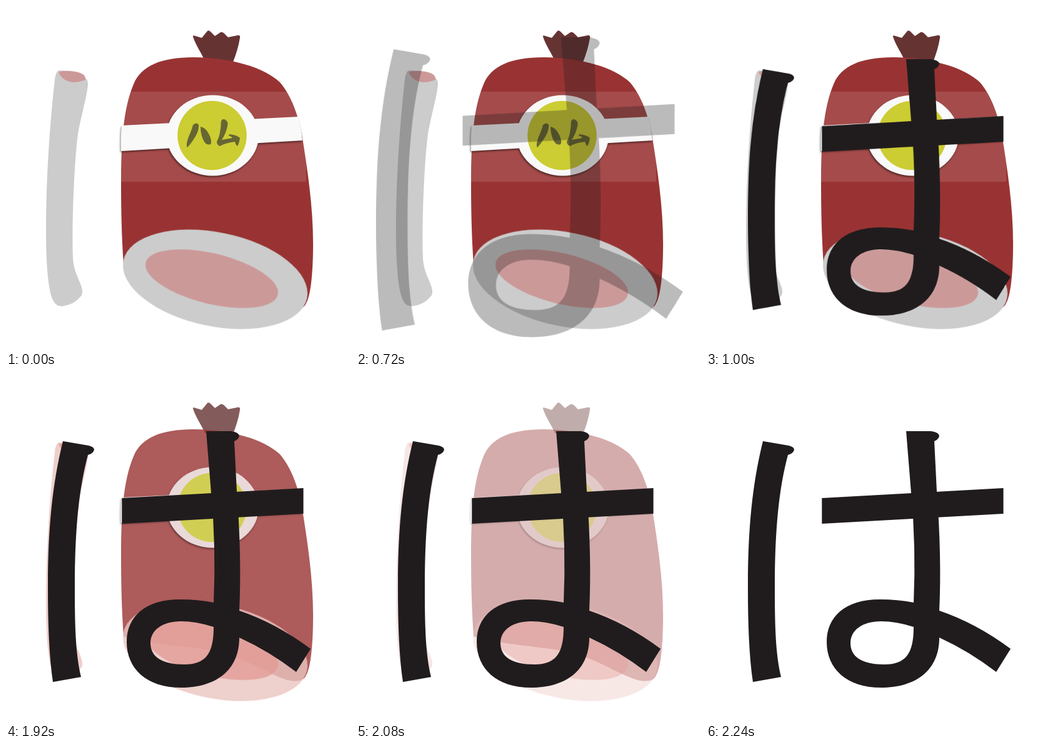
An HTML page without scripts for the animation above (2960 ms loop, 550x550 px).

```html
<!DOCTYPE html>
<html lang="ja">
<head>
<meta charset="utf-8">
<title>は</title>
<style>
  html, body { margin: 0; height: 100%; overflow: hidden; background: #fff; }
  svg { display: block; width: 100vw; height: 100vh; }

  .fade { animation: fade 2960ms infinite; }
  .rind { fill: #ccc; --warm: #eac4bf; }
  .meat { fill: #c99; --warm: #e39a95; }
  .rind, .meat { animation: fade 2960ms infinite, blush 2960ms step-end infinite; }
  .shine { animation: vanish 2960ms step-end infinite; }
  .wrapper { fill: #f9f9f9; filter: drop-shadow(-1px 2px 1.5px rgb(0 0 0 / .5)); }
  .kana {
    fill: #201c1d;
    transform-origin: 274px 290.5px;
    animation: land 2960ms infinite;
  }

  /* the letter shrinks into place, ten steps of 40 ms */
  @keyframes land {
    0% { opacity: 0; transform: scale(1.24); animation-timing-function: step-end; }
    20.27% { opacity: 0; transform: scale(1.24); animation-timing-function: steps(10); }
    33.78%, 100% { opacity: 1; transform: none; }
  }
  /* the ham drops to 80 %, then fades evenly */
  @keyframes fade {
    0% { opacity: 1; animation-timing-function: step-end; }
    64.864% { opacity: .8; animation-timing-function: steps(8); }
    75.675%, 100% { opacity: 0; }
  }
  @keyframes blush { 64.864%, 100% { fill: var(--warm); } }
  @keyframes vanish { 64.864%, 100% { visibility: hidden; } }
</style>
</head>
<body>
<svg viewBox="0 0 550 550" role="img" aria-label="ハム, は">
  <defs>
    <path id="body" d="M188 413C185 370 184 330 184 285C184 220 187 165 204 125C216 96 247 82 300 82
      C362 83 412 98 438 122C458 146 467 176 473 205C482 262 491 320 491 380C491 420 488 462 480 475
      Q476 487 455 484C425 478 390 450 340 438C290 428 225 426 188 413Z"/>
    <clipPath id="inBody"><use href="#body"/></clipPath>
  </defs>

  <path class="rind" d="M84 103Q79 106 78 118C70 190 64 275 64 360C64 410 67 450 74 468Q79 481 90 480
    Q108 478 119 465Q124 460 121 450C117 436 108 425 107 402C105 350 109 250 115 205
    C120 176 130 142 131 125Q131 117 126 115Q112 103 84 103Z"/>
  <path class="meat" d="M84 106C90 102 118 103 125 111Q128 115 127 118Q117 122 107 122Q90 120 84 106Z"/>

  <path class="fade" fill="#633" d="M299 49Q298 46 303 48L313 51L322 40Q324 38 327 41L334 48L343 42
    Q346 41 349 44L355 50L370 47Q375 46 374 51Q371 70 362 92L318 88C313 76 303 62 299 49Z"/>
  <use class="fade" href="#body" fill="#933"/>
  <rect class="shine" x="180" y="137" width="300" height="144" fill="#fff" fill-opacity=".12" clip-path="url(#inBody)"/>
  <ellipse class="rind" cx="334.5" cy="437" rx="149.8" ry="75.1" transform="rotate(11.6 334.5 437)"/>
  <ellipse class="meat" cx="329" cy="436" rx="108.7" ry="40.4" transform="rotate(13.7 329 436)"/>

  <g class="fade wrapper">
    <path d="M185 191L467 177Q472 195 474 215L184 232Q183 210 185 191Z"/>
    <ellipse cx="330.5" cy="207" rx="73.5" ry="64.5"/>
  </g>
  <circle class="fade" cx="329.5" cy="207" r="55.3" fill="#cc3"/>
  <g class="fade" fill="#663" aria-label="ハム">
    <path d="M299 190Q305 185 308 190Q309 199 302 210Q295 221 290 226Q287 223 292 209Q297 198 299 190Z"/>
    <path d="M311 193Q319 194 325 206Q330 217 327 221Q321 223 317 217Q311 207 311 193Z"/>
    <path d="M344 184Q346 179 351 182Q356 186 354 192Q352 203 345 214L362 211Q359 207 356 208L357 205
      Q369 206 374 211Q373 219 370 224Q367 222 366 217Q350 219 342 224Q337 222 337 217Q343 207 344 184Z"/>
  </g>

  <g class="kana">
    <path d="M91 101L132 108Q141 110 141 115Q139 121 131 123C117 175 110 240 110 335
      C110 395 111 440 120 478L75 486C69 445 67 395 67 335C67 240 74 170 91 101Z"/>
    <path d="M185.3 192L475.5 176V217L185.3 233Z"/>
    <path fill-rule="evenodd" d="M320 85H360Q373 87 373 93Q371 99 365 101L369 182Q377 285 373 372
      Q432 392 487 433L464 470Q421 437 373 415C373 468 335 495 280 495C225 495 193 465 193 422
      C193 382 222 354 278 354Q306 354 332 359Q336 270 328 184Z
      M332 398Q304 389 280 389C250 389 231 403 231 424C231 446 250 458 285 458C320 458 332 440 332 398Z"/>
  </g>
</svg>
</body>
</html>
```
